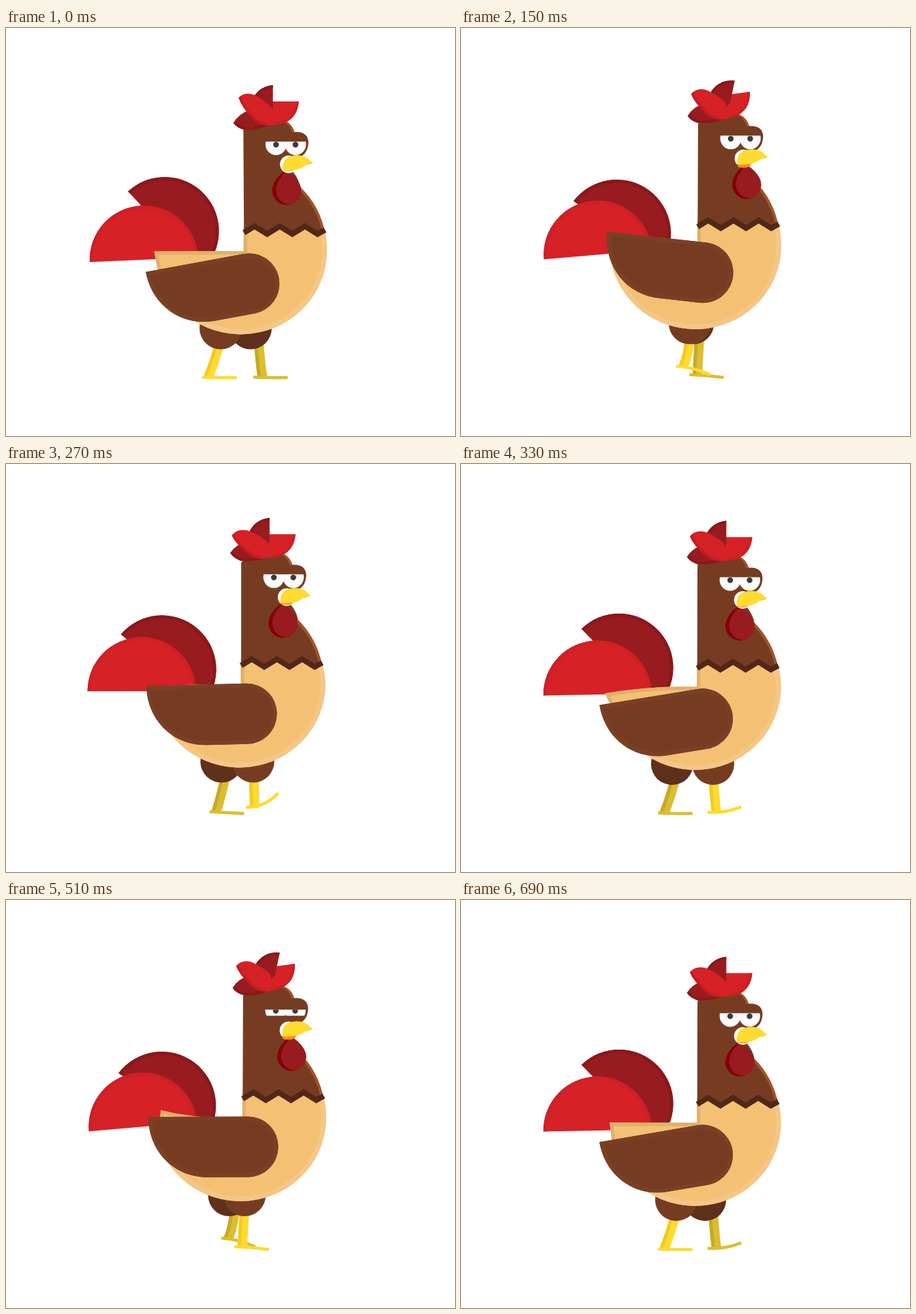
An HTML page with a canvas that plays this animation: 659x600 px, repeating every 0.72 s.

```html
<!DOCTYPE html>
<html lang="en">
<head>
<meta charset="utf-8">
<title>Walking rooster</title>
<style>
html, body { margin: 0; width: 100%; height: 100%; overflow: hidden; background: #fff; }
canvas { display: block; width: 659px; height: 600px; }
</style>
</head>
<body>
<canvas id="stage" width="659" height="600"></canvas>
<script>
const ctx = document.getElementById('stage').getContext('2d');
const LOOP = 720, STRIDE = 360, STEP = 30, RAD = Math.PI / 180;

const BROWN = '#763c22', DARK_BROWN = '#5f301b', RED = '#d62127', DARK_RED = '#981c1f';
const TAN = '#f4c074', YELLOW = '#ffda2f';

const cos = deg => Math.cos(deg * RAD);
const ease = x => (1 - cos(180 * x)) / 2;
const hump = x => x > 0 && x < 1 ? Math.sin(Math.PI * x) ** 2 : 0;

// Quick push forward, slow drift back, once per stride
function pushAt(phase) {
  const p = (phase + 60) % STRIDE;
  return p < 70 ? ease(p / 70) : ease((STRIDE - p) / 290);
}

function group(x, y, angle, draw) {
  ctx.save();
  ctx.translate(x, y);
  ctx.rotate(angle * RAD);
  draw();
  ctx.restore();
}

const asPath = p => typeof p === 'string' ? new Path2D(p) : p;

function fill(path, color) {
  ctx.fillStyle = color;
  ctx.fill(asPath(path));
}

function line(path, color, width) {
  ctx.strokeStyle = color;
  ctx.lineWidth = width;
  ctx.stroke(asPath(path));
}

// Filled shape with an inner edge of another tone
function rimmed(path, color, edge, tone, width) {
  ctx.save();
  fill(path, color);
  ctx.clip(asPath(path));
  line(edge, tone, width * 2);
  ctx.restore();
}

function oval(x, y, rx, ry, color) {
  ctx.fillStyle = color;
  ctx.beginPath();
  ctx.ellipse(x, y, rx, ry, 0, 0, 7);
  ctx.fill();
}

function feather(x, y, angle, color, tone) {
  group(x, y, angle, () =>
    rimmed('M-79.5 0A79.5 79.5 0 0 1 79.5 0Z', color, 'M-79.5 0A79.5 79.5 0 0 1 79.5 0', tone, 5));
}

function tail(phase) {
  const sway = cos(phase - 25);
  feather(230.3 + 3 * sway, 301 - 2.6 * sway, 41.5 + 5.8 * cos(phase - 10), DARK_RED, '#8b181b');
  feather(199 + 3.5 * pushAt(phase), 336.2 + 5 * sway, -3 + 3 * cos(phase - 280), RED, '#cf2026');
}

// The foot swings forward in the first half of the cycle, then stands
function leg(time, rise, far) {
  const t = time % LOOP, swing = t / STRIDE, c = cos(t / 2);
  const bend = hump(swing);
  const hip = 342 - 28 * c, top = 458 + rise;
  const heelX = 325.5 - 37.5 * c, heelY = 513.5 - 17.5 * bend - 4 * hump(swing - 1);
  const ankleX = heelX + 11 - 2.5 * c, ankleY = heelY - 1;
  const curl = 219 * bend * swing ** 4.5;
  const toeX = heelX + 50.5 - curl / 10, toeY = 514 - curl;

  const main = far ? '#dbbd30' : YELLOW, shade = far ? '#c6a925' : '#f0cb25';
  const kneeX = hip * 0.6 + ankleX * 0.4 + 4 * bend;
  const shin = `M${hip + 1} ${top}Q${kneeX} ${(top + ankleY) / 2 + 4} ${ankleX} ${ankleY + 2}`;
  line(shin, main, 14);
  group(-4.5, 0, 0, () => line(shin, shade, 5));
  line(`M${heelX} ${heelY}Q${ankleX + 14} ${heelY + 1} ${toeX} ${toeY}`, main, 4.5);
  oval(far ? 334 - 25 * c : 343 - 28 * c, 441.5 + rise, 31, 31, far ? DARK_BROWN : BROWN);
}

function belly(cx, cy, x, y, kx, ky) {
  const left = 349 + cx, mid = 328 + y, right = 471 + x, low = 223.5 + x;
  const rump = `M${left} ${292 + cy}V${mid}H${left - 25}Q${left - 75} ${mid} ${kx} ${ky}L${low} ${mid + 32}`;
  const chest = `A126 123 0 0 0 ${right} ${mid}Q${right} ${315 + cy} ${468.5 + cx} ${298 + cy}`;
  const shape = new Path2D(rump + chest + 'Z');
  rimmed(shape, TAN, `M${low} ${mid + 32}${chest}`, '#f5c685', 7);
  ctx.save();
  ctx.clip(shape);
  line(rump, '#dfb06c', 10);
  ctx.restore();
}

function neck(hx, cx, y) {
  const p = (x, py) => `${x + hx} ${py + y} `;
  const c = (x, py) => `${x + cx} ${py + y} `;
  const side = `${p(433, 234)}Q${c(461, 262)}${c(468.5, 302)}`;
  let hem = `M${c(349.5, 301)}`;
  for (let i = 0; i < 6; i++) hem += `L${c(365 + 18.5 * i, i % 2 ? 303 : 291.5)}`;
  hem += `L${c(468.5, 297)}`;
  const shape = new Path2D(
    `${hem}L${c(468.5, 302)}Q${c(461, 262)}${p(433, 234)}Q${p(431, 222)}${p(422, 211)}` +
    `L${p(432, 190)}Q${p(444, 185)}${p(445, 169)}Q${p(445, 155)}${p(431, 153)}` +
    `L${p(424.5, 153)}Q${p(419, 134)}${p(395, 133)}Q${p(360, 134)}${p(349.5, 150)}Z`);
  rimmed(shape, BROWN, `M${side}`, '#a4532b', 4);
  ctx.save();
  ctx.clip(shape);
  line(`M${p(408, 133)}Q${p(421, 138)}${p(425, 153)}`, '#a4532b', 8);
  ctx.restore();
  line(hem, '#4f2817', 8);
}

function comb(push, flap) {
  const lobe = (angle, edge, rest, color, tone) => group(386.2 + 1.8 * push, 140, angle, () => {
    ctx.translate(-388, -140);
    rimmed(edge + rest, color, edge, tone, 4);
  });
  const back = 1 - push;
  lobe(5 * back, 'M390 142Q368 151 351 150Q340 147 335 140', 'Q342 127 358 121Z', DARK_RED, '#8a181b');
  lobe(-8 * flap, 'M431 108Q429 131 411 139Q400 143 383 143', 'L388 108Z', RED, '#cc1f25');
  lobe(12 * flap, 'M393 84Q371 86 362 107', 'L384 130L393 118Z', DARK_RED, '#8a181b');
  lobe(-9.5 * back, 'M383 143Q372 142 364 134Q347 116 343 102', 'Q352 93 366 98Q381 106 392 118L396 142Z', RED, '#c41c22');
}

function eyes(blink) {
  ctx.save();
  ctx.beginPath();
  ctx.rect(370, 167 + 3 * blink, 80, 21 - 12 * blink);
  ctx.clip();
  for (const x of [397.5, 426]) oval(x, 171, 15.5, 16, '#fbfafc');
  for (const x of [397.5, 426]) oval(x, 171.5, 4.2, 4.2, '#3b3a3b');
  ctx.restore();
}

function face(push, flap, blink) {
  eyes(blink);
  group(9 * flap - 2.5 * (1 - push), 0, 0, () => {
    const drop = 'M412 209Q434 224 434.5 239A21 21 0 0 1 392 239Q393 222 412 209Z';
    fill(drop, '#830305');
    ctx.save();
    ctx.clip(new Path2D(drop));
    group(5.5, -1, 0, () => fill(drop, DARK_RED));
    ctx.restore();
  });
  oval(416, 200.5, 12.8, 13, '#fffdf8');
  group(0, 3.2 * flap + 1.6 * (1 - push), 0, () =>
    fill('M407 204H428Q426 209 420 210Q412 211 408 209Z', '#f58a1f'));
  fill('M407 204Q408 192 418 189Q429 185 439 189Q445 191 447 195L452 198Q449 201 440 202Q434 208 423 209Q413 211 408 209Z', YELLOW);
}

function wing(x, y, angle) {
  group(x, y, angle, () => {
    const d = 'M-146 -44.5H0A44.5 44.5 0 0 1 0 44.5H-60C-110 44 -146 5 -146 -44.5Z';
    rimmed(d, '#753c22', d, '#7a4025', 6);
  });
}

function draw(time) {
  const phase = time % STRIDE;
  const push = pushAt(phase), flap = hump(phase / 270);
  const up = ease(phase / 180);
  const sag = Math.max(0, cos((time - 330) / 2));
  const beat = time < STRIDE ? 18 : 11;
  const blink = Math.max(0, 1 - Math.abs(time - 510) / 60);
  const bodyY = -8 * up, headY = -9.3 * up;
  const headX = -2 + 2.5 * cos(phase - 70), collarX = -4.5 * (1 - push);

  ctx.fillStyle = '#fff';
  ctx.fillRect(0, 0, 659, 600);
  tail(phase);
  leg(time + STRIDE, bodyY, true);
  leg(time, bodyY, false);
  belly(collarX, headY, -2.3 * (1 - push), bodyY, 217.5 + 10.5 * up - 7 * sag, 328.5 - 20.5 * up + 10 * sag);
  neck(headX, collarX, headY);
  wing(353 + 4 * push, 376 - up * (8.5 + beat / 2), -10.5 + beat * up);
  group(headX, headY, 0, () => {
    comb(push, flap);
    face(push, flap, blink);
  });
}

const start = performance.now();
function tick() {
  const time = (performance.now() - start) % LOOP;
  draw(Math.floor(time / STEP) * STEP);
  requestAnimationFrame(tick);
}
tick();
</script>
</body>
</html>
```
